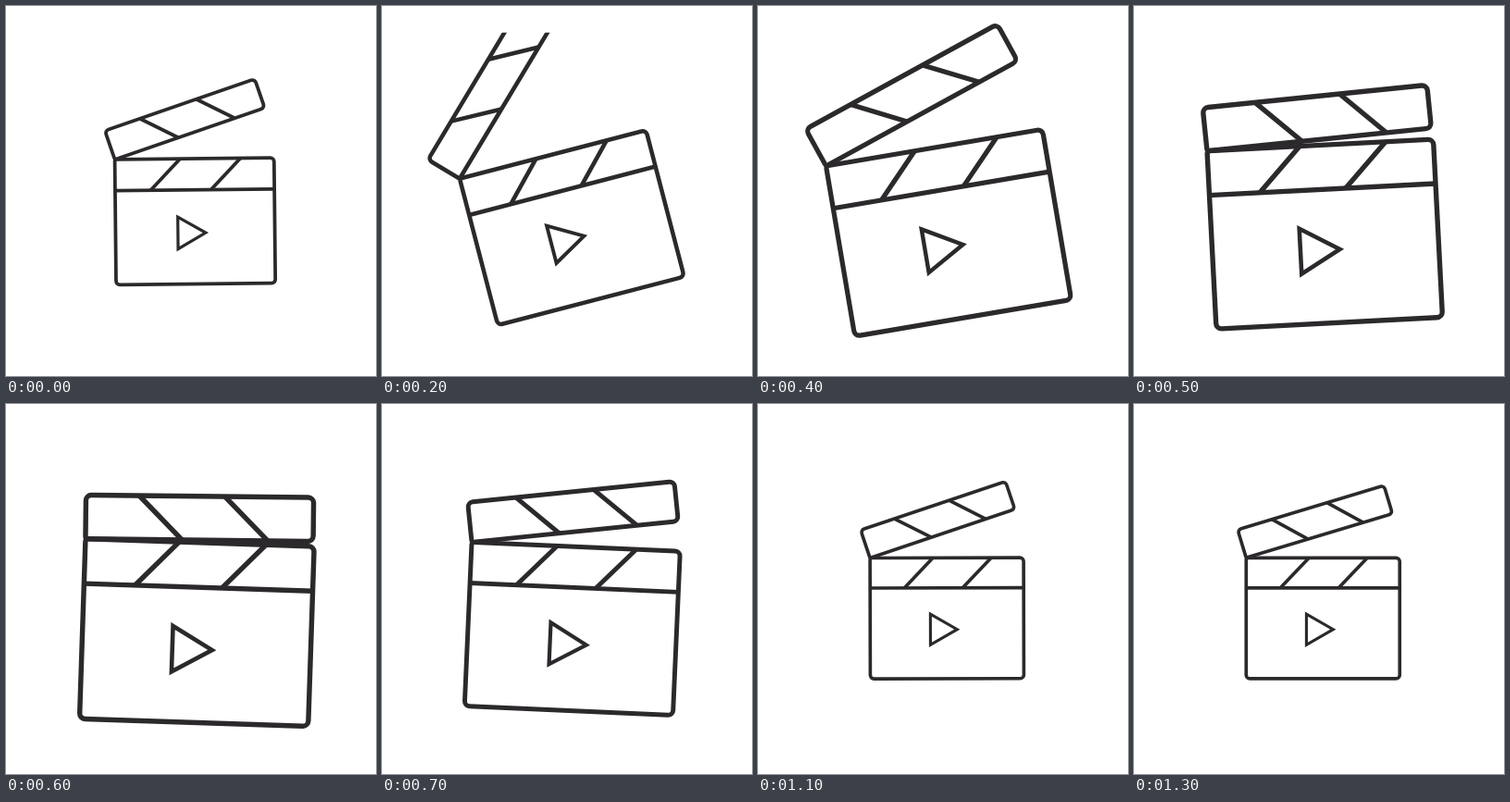
Recreate the animation shown at these times as an HTML page with a canvas. Size 400 by 400 pixels, loop 1.4 s.

```html
<!DOCTYPE html>
<html lang="en">
<head>
<meta charset="utf-8">
<title>Clapperboard</title>
<style>
  html, body { margin: 0; width: 100%; height: 100%; overflow: hidden; background: #fff; }
  canvas { display: block; width: 400px; height: 400px; }
</style>
</head>
<body>
<canvas id="stage"></canvas>
<script>
const canvas = document.getElementById('stage');
const ctx = canvas.getContext('2d');
const dpr = window.devicePixelRatio || 1;
canvas.width = canvas.height = 400 * dpr;

const LOOP = 1400, STEP = 100;
const INK = '#2c292c';
const LINE = 3.65;
const HALF_W = 83, HALF_H = 65.3, RULE_Y = -32.8;
const ARM_W = 165.2, ARM_H = 31.8;

// Key points: [time in ms, value]; the move begins just before the loop point
const ZOOM = [[-60, 1], [600, 1.49], [1035, 1]];
const TILT = [[-35, 0], [240, -15.4], [660, 2.8], [900, -1.4], [1150, 0]];
const OPEN = [[-40, -16.8], [220, -44.8], [545, -0.8], [570, -0.8], [890, -22], [1230, -16.8]];

const rad = deg => deg * Math.PI / 180;

// Cosine ease between neighbouring keys; bias below 1 speeds up the start
function valueAt(keys, t, bias = 1) {
  const next = keys.findIndex(([time]) => time > t);
  if (next === 0) return keys[0][1];
  if (next < 0) return keys[keys.length - 1][1];
  const [t0, v0] = keys[next - 1];
  const [t1, v1] = keys[next];
  const p = ((t - t0) / (t1 - t0)) ** bias;
  return v0 + (v1 - v0) * (1 - Math.cos(Math.PI * p)) / 2;
}

function box(x, y, w, h, radii) {
  ctx.beginPath();
  ctx.roundRect(x, y, w, h, radii);
  ctx.stroke();
}

function path(points, closed) {
  ctx.beginPath();
  points.forEach(([x, y]) => ctx.lineTo(x, y));
  if (closed) ctx.closePath();
  ctx.stroke();
}

function placed(x, y, angle, paint) {
  ctx.save();
  ctx.translate(x, y);
  ctx.rotate(rad(angle));
  paint();
  ctx.restore();
}

function drawArm() {
  box(0, -ARM_H, ARM_W, ARM_H, [4, 4, 4, 1.5]);
  for (const x of [38.6, 100.8]) path([[x, -ARM_H], [x + 31.4, 0]]);
}

function drawBody(open) {
  box(-HALF_W, -HALF_H, 2 * HALF_W, 2 * HALF_H, [2, 4, 4, 4]);
  path([[-HALF_W, RULE_Y], [HALF_W, RULE_Y]]);
  for (const x of [-46, 17]) path([[x, RULE_Y], [x + 31, -HALF_H]]);
  placed(-HALF_W, -HALF_H, open, drawArm);
}

function drawPlay() {
  ctx.lineWidth = 3.1;
  path([[-9.7, -16.6], [19.2, 0], [-9.7, 16.6]], true);
}

function draw(elapsed) {
  const step = Math.floor(elapsed / STEP) * STEP;
  const t = (step + STEP) % LOOP - STEP;
  const zoom = valueAt(ZOOM, t, 0.72);
  const tilt = valueAt(TILT, t);
  const open = valueAt(OPEN, t);

  ctx.setTransform(dpr, 0, 0, dpr, 0, 0);
  ctx.fillStyle = '#fff';
  ctx.fillRect(0, 0, 400, 400);

  ctx.save();
  ctx.translate(200, 200);
  ctx.scale(zoom, zoom);
  ctx.beginPath();
  ctx.rect(-136.5, -136.5, 273, 273);
  ctx.clip();
  ctx.strokeStyle = INK;
  ctx.lineWidth = LINE;
  placed(4.25, 31.6, tilt, () => drawBody(open));
  placed(-3.9, 43.7, tilt, drawPlay);
  ctx.restore();
}

const start = performance.now();
function tick() {
  draw(performance.now() - start);
  requestAnimationFrame(tick);
}
tick();
</script>
</body>
</html>
```
